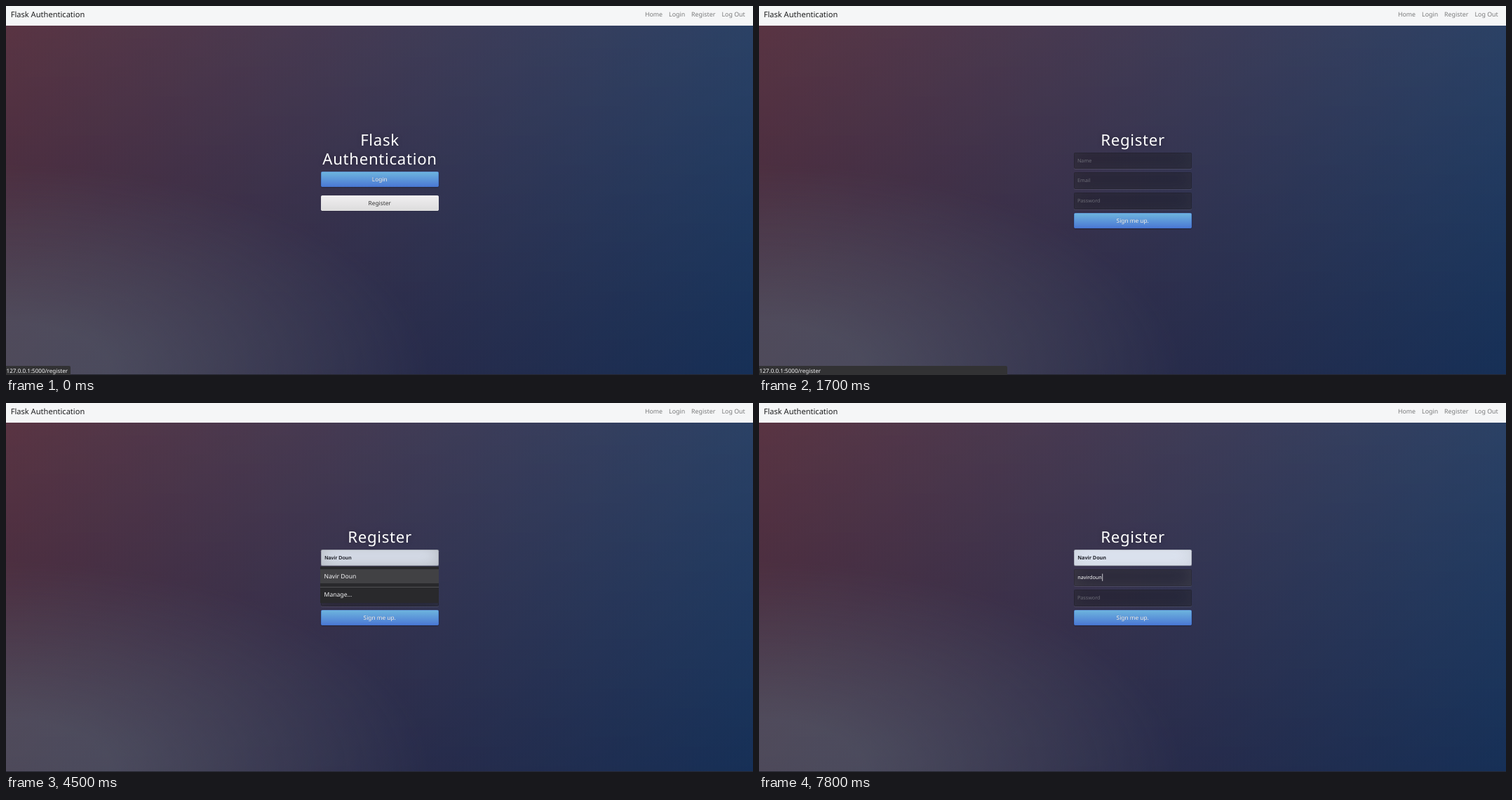
Animation of 1065x526 px, one loop 8 s. Source, as an HTML page:

```html
<!DOCTYPE html>
<html lang="en">
<head>
<meta charset="utf-8">
<title>Flask Authentication</title>
<style>
html, body { margin: 0; width: 1065px; height: 526px; overflow: hidden; background: #25262f; }
#stage { position: relative; width: 1065px; height: 526px; overflow: hidden; }
#stage div, svg { position: absolute; }
svg { left: 0; top: 0; }
#page {
  left: 0; top: -3.5px; width: 1065px; height: 528.5px;
  background:
    radial-gradient(ellipse at 0% 100%, rgba(104,128,138,.4) 10%, rgba(138,114,76,0) 40%),
    linear-gradient(to bottom, rgba(57,173,219,.25) 0%, rgba(42,60,87,.4) 100%),
    linear-gradient(135deg, #670d10 0%, #092756 100%);
}
#nav { left: 0; top: 0; width: 1065px; height: 27.5px; background: #f5f6f7; }
.btn { left: 448.8px; width: 168px; height: 22px; border-radius: 2.8px; }
.blue {
  background: linear-gradient(#6eb6de, #4a77d4);
  box-shadow: inset 0 0 0 .55px #3f6cc4, inset 0 1px 0 rgba(255,255,255,.15), 0 .6px 1.2px rgba(0,0,0,.5);
}
.gray { background: linear-gradient(#f1eff1, #dcdcdc); }
.field {
  left: 448.6px; width: 168.2px; height: 23.6px; border-radius: 2.2px;
  background: rgba(0,0,0,.3);
}
.menu { left: 448.4px; width: 168.6px; }
#status { left: 0; top: 513px; height: 13px; background: #323234; border-radius: 0 2px 0 0; }
text { font-family: "Noto Sans", sans-serif; white-space: pre; }
.h1 { font-size: 22.19px; letter-spacing: .7px; fill: #fff; text-anchor: middle; filter: drop-shadow(0 0 3px rgba(0,0,0,.3)); }
.cap { font-size: 8.32px; fill: #fff; text-anchor: middle; }
.lit { filter: drop-shadow(.5px .5px .4px rgba(0,0,0,.4)); }
.hint { font-size: 7.21px; fill: #6c6c77; }
.val { font-size: 7.21px; fill: #fff; }
.item { font-size: 8.6px; fill: #f4f4f6; }
.link { font-size: 8.87px; fill: #7a7b7c; }
</style>
</head>
<body>
<div id="stage">
  <div id="page"></div>
  <div id="nav"></div>

  <div id="home">
    <div class="btn blue" style="top:236px"></div>
    <div class="btn gray" id="regBtn" style="top:270px"></div>
  </div>

  <div id="form">
    <div class="field" id="nameBox" style="top:208.8px"></div>
    <div class="field" id="mailBox" style="top:237.4px"></div>
    <div class="field" id="passBox" style="top:266px"></div>
    <div class="btn blue" style="top:295px"></div>
    <div id="menu">
      <div class="menu" style="top:233px;height:51.5px;background:#29292c"></div>
      <div class="menu" id="rowBox" style="top:236.8px;height:20.3px;background:#414144"></div>
      <div class="menu" style="top:261.6px;height:.7px;background:#505054"></div>
    </div>
  </div>

  <div id="status"></div>

  <svg width="1065" height="526" viewBox="0 0 1065 526" text-rendering="geometricPrecision">
    <text x="6.7" y="15.9" font-size="11.09" fill="#1d1e1f">Flask Authentication</text>
    <g class="link">
      <text x="910.9" y="15.2">Home</text>
      <text x="945" y="15.2">Login</text>
      <text x="977.1" y="15.2">Register</text>
      <text x="1020.4" y="15.2">Log Out</text>
    </g>

    <g id="homeText">
      <text class="h1" x="533" y="198.7">Flask</text>
      <text class="h1" x="533" y="225.6">Authentication</text>
      <text class="cap lit" x="532.7" y="250.2">Login</text>
      <text class="cap" x="532.7" y="284.1" style="fill:#333">Register</text>
    </g>

    <g id="formText">
      <text class="h1" x="533" y="198.7">Register</text>
      <text class="hint" id="nameHint" x="453.9" y="222.8">Name</text>
      <text class="hint" id="mailHint" x="453.9" y="251.4">Email</text>
      <text class="hint" id="passHint" x="453.9" y="280">Password</text>
      <text class="cap lit" x="532.7" y="309.4">Sign me up.</text>
      <text class="val" id="nameVal" x="454.2" y="222.8" font-weight="600" style="fill:#20222b">Navir Doun</text>
      <text class="val" id="mailVal" x="454.2" y="251.4"></text>
      <g id="menuText" class="item">
        <text x="453.6" y="249.6">Navir Doun</text>
        <text x="453.6" y="275.6">Manage…</text>
      </g>
      <rect id="caret" width=".8" height="10.4" fill="#f2f2f4"/>
    </g>

    <text id="url" x=".6" y="522.5" font-size="8.1" fill="#f2f2f4">127.0.0.1:5000/register</text>
  </svg>
</div>

<script>
const LOOP = 8000, STEP = 100;
const LOGIN = "navirdoun";
const KEYS = [6400, 6600, 6800, 6900, 7000, 7200, 7500, 7700, 7800];
const $ = id => document.getElementById(id);
const ramp = (t, from, to) => Math.min(1, Math.max(0, (t - from) / (to - from)));
const ease = u => u * u * (3 - 2 * u);
const within = (t, from, to) => t >= from && t < to;

function show(on, ...ids) {
  for (const id of ids) $(id).style.display = on ? "" : "none";
}

// focus: 0 resting, 1 focused; fill: 0 empty, 1 autofilled
function field(id, focus, fill) {
  const s = $(id).style, a = 0.2 + 0.2 * focus;
  s.background = fill > 0
    ? `rgba(${228 * fill},${235 * fill},${248 * fill},${0.3 + 0.7 * fill})`
    : "rgba(0,0,0,.3)";
  s.boxShadow = "inset 0 0 0 .55px rgba(0,0,0,.3)," +
    `inset 0 -2.8px 25px rgba(100,100,100,${a}),` +
    "0 .6px .6px rgba(255,255,255,.2)";
}

function caret(on, x, y) {
  show(on, "caret");
  $("caret").setAttribute("x", x);
  $("caret").setAttribute("y", y);
}

function draw(now) {
  const t = Math.floor((now % LOOP) / STEP) * STEP;
  const form = t >= 1700;
  show(!form, "home", "homeText");
  show(form, "form", "formText");

  // status bubble
  const left = 1 - ramp(t, 1800, 2100);
  $("status").style.width = (t < 1400 ? 91.7 : 353.5) + "px";
  $("status").style.opacity = $("url").style.opacity = left;

  const ring = 0.25 * ramp(t, 1400, 1600);
  $("regBtn").style.boxShadow = "inset 0 0 0 .55px #e2e2e2, 0 .6px 1px rgba(0,0,0,.25)," +
    `0 0 0 2.2px rgba(13,110,253,${ring})`;

  // fields
  const blur = ease(ramp(t, 4900, 5500));
  const nameFocus = ease(ramp(t, 2400, 2600)) * (1 - blur);
  field("nameBox", nameFocus, ramp(t, 4300, 4500));
  field("mailBox", blur, 0);
  field("passBox", 0, 0);

  const open = within(t, 2500, 4800), filled = t >= 4400;
  show(open, "menu", "menuText");
  show(t >= 4400, "rowBox");
  show(!filled, "nameHint");
  show(filled, "nameVal");
  $("nameHint").style.opacity = 1 - 0.3 * nameFocus;
  $("nameVal").style.fontFamily = t < 4800 ? '"Liberation Sans", sans-serif' : "";

  const typed = LOGIN.slice(0, KEYS.filter(k => t >= k).length);
  $("mailVal").textContent = typed;
  show(!open && !typed, "mailHint");
  show(!open, "passHint");
  $("mailHint").style.opacity = 1 - 0.2 * blur;

  // caret
  if (t < 5100) {
    caret(within(t, 2500, 4400), 454.6, 214.8);
  } else {
    const w = typed ? $("mailVal").getComputedTextLength() + 0.2 : 0;
    caret(!within(t, 5700, 6300), 454.6 + w, 243.4);
  }
}

const start = performance.now();
function tick() {
  draw(performance.now() - start);
  requestAnimationFrame(tick);
}
tick();
</script>
</body>
</html>
```
